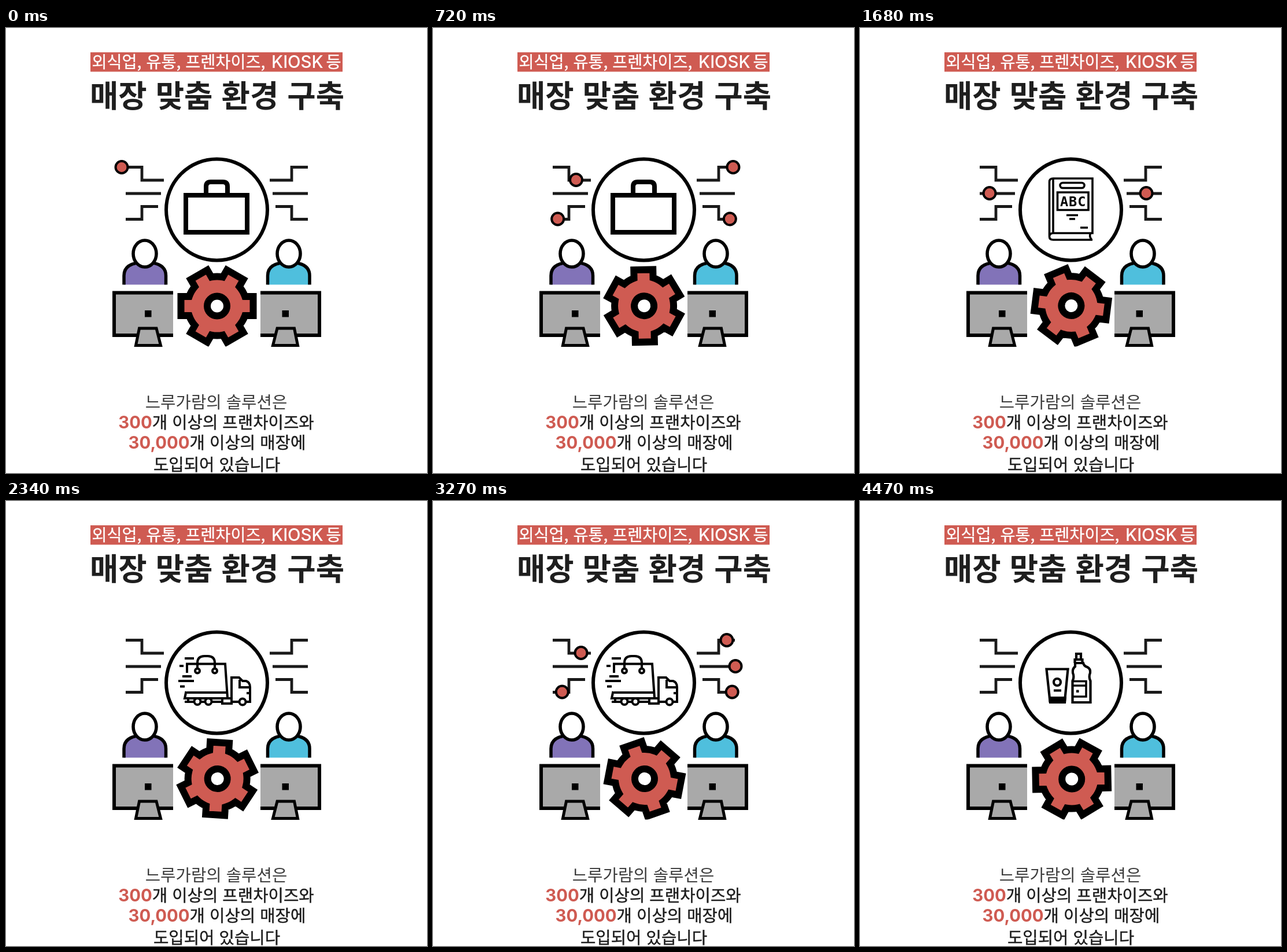
Write an HTML page that moves like this. It is 728 px wide and 769 px high and loops after 4500 ms.

```html
<!DOCTYPE html>
<html lang="ko">
<head>
<meta charset="utf-8">
<style>
  html, body { margin: 0; width: 100%; height: 100%; overflow: hidden; background: #fff; }
  svg { display: block; width: 728px; height: 769px; }
  text { font: 500 28.7px 'Noto Sans CJK KR', 'Noto Sans CJK', sans-serif; fill: #1e1e1e; }
  .mid { text-anchor: middle; }
  .medium { stroke: #1e1e1e; stroke-width: .45; }
  .light { font-weight: 300; fill: #3c3c3c; }
  .title { font-size: 53.7px; font-weight: 700; }
  .tag text { font-size: 28.3px; fill: #fff; stroke: #fff; stroke-width: .35; }
  .latin, .tag .latin { font-family: Inter, sans-serif; font-size: 29.3px; stroke: none; }
  .num { font-weight: 700; fill: #cf5b52; }
  .art { fill: none; stroke: #000; }
  .solid { fill: #000; stroke: none; }
  .abc { font: 700 23.5px 'DejaVu Sans Mono', monospace; letter-spacing: 1px; }
</style>
</head>
<body>
<svg viewBox="0 0 728 769">
  <defs>
    <clipPath id="floor"><rect y="400" width="728" height="150.5"/></clipPath>
    <g id="side">
      <path d="M207 240.5H235V263H273M207 286H268M207 330.5H235V308.5H263" stroke="#1a1a1a" stroke-width="4.8"/>
      <path d="M204 443.5V428C204 409 222 405 240 405S276.5 409 276.5 428V443.5" fill="currentColor" stroke-width="5.5"/>
      <ellipse cx="240" cy="390" rx="20" ry="23" fill="#fff" stroke-width="5.6"/>
      <path d="M289 457.5H187V531H289" fill="#a9a9a9" stroke-width="6"/>
      <path d="M224.5 548.5L230.5 519H260L267.5 548.5Z" fill="#a9a9a9" stroke-width="5"/>
      <rect class="solid" x="240" y="488" width="11.5" height="11.5"/>
    </g>
  </defs>

  <rect x="146" y="42" width="436" height="33.5" fill="#cf5b52"/>
  <g class="tag">
    <text x="148.5" y="68.5">외식업, 유통, 프렌차이즈,</text>
    <text x="459" y="68.5" class="latin">KIOSK</text>
    <text x="553.5" y="68.5">등</text>
  </g>
  <text x="365" y="137" class="mid title">매장 맞춤 환경 구축</text>

  <g class="art">
    <use href="#side" color="#8273b8"/>
    <use href="#side" color="#4fbfdd" transform="translate(729) scale(-1 1)"/>
    <circle cx="364.5" cy="314" r="87.5" fill="#fff" stroke-width="6"/>

    <g class="icon" stroke-width="8">
      <path d="M311 289H417V353H311ZM346 286V274Q346 266 354 266H375Q383 266 383 274V286"/>
    </g>
    <g class="icon" stroke-width="3.6">
      <path d="M402 366H334Q327.5 366 327.5 360.5V266Q327.5 260 334 260H402V354.5H334Q328 354.5 327.5 360M334 260V354M398.5 355Q396 360 400 365"/>
      <rect x="346" y="267.5" width="42" height="9" rx="4.5"/>
      <path d="M341.5 284H395V314.5H341.5ZM357 323.5H377M362 330H372M381 345H394"/>
      <text x="368.7" y="308" class="mid solid abc">ABC</text>
    </g>
    <g class="icon" stroke-width="4">
      <path d="M313 297V281.5H379L383 340M331 290V280Q331 268 343 268H349Q361 268 361 280V290"/>
      <path d="M309 272H325M300 285H307M305 303H321M298 311H325M301 320.5H309"/>
      <path d="M313 331H381M311.5 329L309 341H390M309 347H324M315 340V347M338 347H343M357 347H374M374 341H390V350H374ZM390 347V305H403L409 311H415Q422 313 422 322V347H416M402 347H390M404 309V322H422M416 332H422"/>
      <g fill="#fff">
        <circle cx="331" cy="293.5" r="4"/><circle cx="361" cy="293.5" r="4"/>
        <circle cx="331" cy="346.5" r="5.5"/><circle cx="350" cy="346.5" r="5.5"/><circle cx="409" cy="347" r="5.5"/>
      </g>
    </g>
    <g class="icon" stroke-width="4.2">
      <path d="M322.5 290.5H359.5L354 346H328.5Z"/>
      <path class="solid" d="M326 338H357L356 350H327Z"/>
      <circle cx="341" cy="313" r="6"/>
      <path d="M335 327.5H348M374 273V264H382V273M371.5 280V274H384.5V280"/>
      <path d="M372 280H386Q387 285 393 287Q399 290 398 297Q395 304 398.500 311V348H367.5V311Q371 304 368 297Q367 290 372 286Z"/>
      <path d="M368 311.5H391V338H368M368 319H391" stroke-width="3.5"/>
      <rect class="solid" x="374" y="326.5" width="4.5" height="4.5"/>
    </g>

    <g clip-path="url(#floor)">
      <g id="gear">
        <path id="rim" fill="#cf5b52" stroke-width="12" stroke-miterlimit="8"/>
        <circle r="17" fill="#fff" stroke-width="12"/>
      </g>
    </g>
    <g id="left" fill="#cf5b52" stroke-width="4"></g>
    <g id="right" fill="#cf5b52" stroke-width="4" transform="translate(729) scale(-1 1)"></g>
  </g>

  <text x="363.5" y="656.5" class="mid light">느루가람의 솔루션은</text>
  <text x="363.5" y="692" class="mid medium"><tspan class="latin num">300</tspan>개 이상의 프랜차이즈와</text>
  <text x="365" y="727" class="mid medium"><tspan class="latin num">30,000</tspan>개 이상의 매장에</text>
  <text x="364.5" y="765" class="mid medium">도입되어 있습니다</text>
</svg>
<script>
const LOOP = 4500, STEP = 30, TRAVEL = 985;
const NS = 'http://www.w3.org/2000/svg';
const $ = id => document.getElementById(id);
const make = (tag, attrs, parent) => {
  const el = document.createElementNS(NS, tag);
  for (const k in attrs) el.setAttribute(k, attrs[k]);
  if (parent) parent.append(el);
  return el;
};

// Square teeth joined by short arcs
function gearPath(teeth, root, tip, half) {
  const base = Math.sqrt(root * root - half * half);
  let d = '';
  for (let i = 0; i < teeth; i++) {
    const a = i * 2 * Math.PI / teeth, c = Math.cos(a), s = Math.sin(a);
    const at = (x, y) => `${x * c - y * s} ${x * s + y * c}`;
    d += (i ? `A${root} ${root} 0 0 1 ` : 'M') + at(base, -half) +
      `L${at(tip, -half)}L${at(tip, half)}L${at(base, half)}`;
  }
  return d + `A${root} ${root} 0 0 1 ${base} ${-half}Z`;
}
$('rim').setAttribute('d', gearPath(6, 51, 62.5, 16.5));

const tracks = ['M200 240.5H235V262.5H273', 'M200 285.5H268', 'M201 330H235V309H265']
  .map(d => make('path', { d }));

// Start times per track: top, middle, bottom
const starts = {
  left: [[0, 2461], [1332, 3347], [550, 3012]],
  right: [[616, 3052], [1188, 3183], [550, 3145]]
};
const dots = Object.entries(starts).flatMap(([side, rows]) => rows.map((times, i) => ({
  times, track: tracks[i], el: make('circle', { r: 10.5 }, $(side))
})));
const icons = document.querySelectorAll('.icon');

function draw(t) {
  $('gear').setAttribute('transform',
    `translate(365.6 480.5) rotate(${180 * t / LOOP}) translate(-.6 0)`);
  const shown = Math.floor(t / LOOP * icons.length);
  icons.forEach((icon, i) => icon.style.display = i === shown ? '' : 'none');
  for (const { times, track, el } of dots) {
    const start = times.find(s => t >= s && t < s + TRAVEL);
    el.style.display = start === undefined ? 'none' : '';
    if (start === undefined) continue;
    const p = track.getPointAtLength((t - start) / TRAVEL * track.getTotalLength());
    el.setAttribute('cx', p.x);
    el.setAttribute('cy', p.y);
  }
}

const begin = performance.now();
function tick() {
  const t = Math.max(0, performance.now() - begin) % LOOP;
  draw(Math.floor(t / STEP) * STEP);
  requestAnimationFrame(tick);
}
tick();
</script>
</body>
</html>
```
